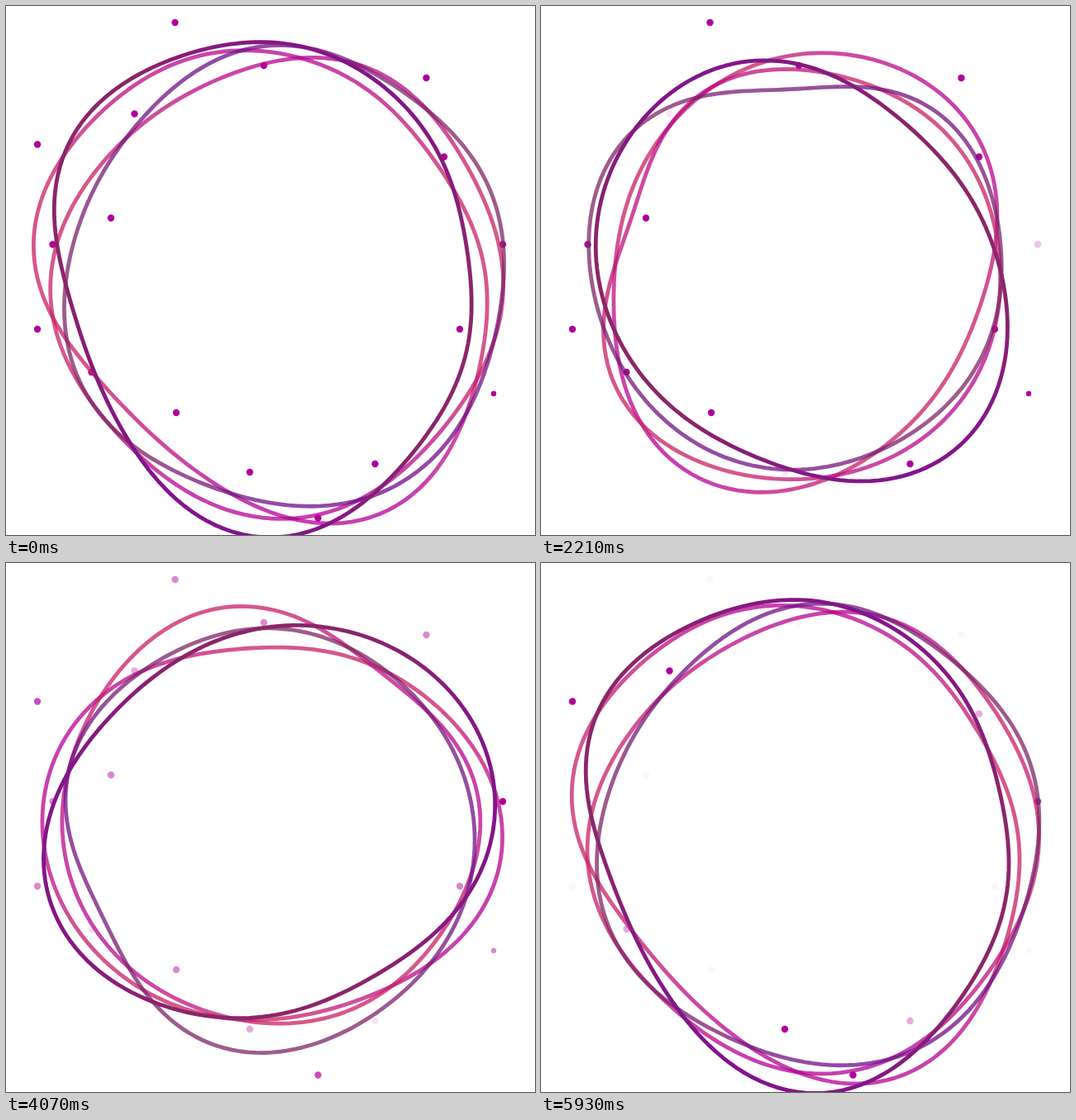
Animation of 640 by 640 pixels, one loop 6000 ms. Source, as an HTML page with a canvas:

```html
<!DOCTYPE html>
<html lang="en">
<head>
<meta charset="utf-8">
<title>Turning rings</title>
<style>
  html, body { margin: 0; width: 100%; height: 100%; overflow: hidden; background: #fff; }
  canvas { display: block; width: 640px; height: 640px; }
</style>
</head>
<body>
<canvas id="stage" width="640" height="640"></canvas>
<script>
const ctx = document.getElementById('stage').getContext('2d');
const LOOP = 6000, BLINK = 2550, CENTER = 320, TAU = Math.PI * 2;

// Each blob swells from its rest outline to its bent one and back.
// Outlines are radii at equal angles, clockwise from the right; axis is the gradient direction.
const wide = {
  axis: 117,
  rest: [241, 262, 290, 323, 285, 246, 252, 287, 284, 276, 262, 245],
  bent: [228, 237, 250, 254, 258, 229, 202, 204, 241, 282, 268, 232]
};
const dented = {
  axis: 90,
  rest: [281, 282, 292, 300, 278, 269, 265, 243, 235, 252, 273, 269],
  bent: [268, 249, 202, 219, 241, 230, 230, 233, 239, 244, 243, 253]
};

const rings = [
  { blob: wide, spin: -1, start: -26, edge: '#b40096', middle: '#c82064', alpha: 0.75 },
  { blob: dented, spin: 1, start: 0, edge: '#b40096', middle: '#c82064', alpha: 0.75 },
  { blob: dented, spin: -1, start: -26, edge: '#6e0c8a', middle: '#7d2666', alpha: 0.75 },
  { blob: wide, spin: 1, start: 0, edge: '#82148c', middle: '#8a2669', alpha: 1 }
];

// Dots stay full until their delay, then blink; a negative delay starts mid-blink.
const dotGroups = [
  { delay: -300, spots: [[204.5, 20], [312, 72], [508.5, 87], [127, 256.5], [56.5, 288.5],
                         [38, 391], [549, 391], [590, 469, 3.2], [206, 492]] },
  { delay: 0, spots: [[530, 182.5], [103.5, 443], [446.5, 554]] },
  { delay: 700, spots: [[155.5, 130.5], [295, 564]] },
  { delay: 950, spots: [[38, 167.5], [377.5, 619.5]] },
  { delay: 1300, spots: [[601, 288.5]] }
];

const mix = (a, b, p) => a + (b - a) * p;
const radians = degrees => degrees / 360 * TAU;
const ease = p => p - 0.05 * Math.sin(TAU * p);
const bend = t => ease(1 - Math.abs(1 - 2 * t / LOOP));

// Trigonometric interpolation through evenly spaced radii.
function radiusAt(radii, angle) {
  const n = radii.length;
  return radii.reduce((sum, r, i) => {
    const d = angle - i * TAU / n;
    const s = Math.sin(d / 2);
    const weight = Math.abs(s) < 1e-6 ? 1 : Math.sin(n * d / 2) * Math.cos(d / 2) / (n * s);
    return sum + r * weight;
  }, 0);
}

function drawRing({ blob, spin, start, edge, middle, alpha }, t) {
  const radii = blob.rest.map((r, i) => mix(r, blob.bent[i], bend(t)));
  ctx.save();
  ctx.translate(CENTER, CENTER);
  ctx.rotate(radians(start) + spin * TAU * t / LOOP);

  ctx.beginPath();
  for (let i = 0; i < 180; i++) {
    const angle = i / 180 * TAU;
    const r = radiusAt(radii, angle);
    ctx.lineTo(r * Math.cos(angle), r * Math.sin(angle));
  }
  ctx.closePath();

  const dx = 280 * Math.cos(radians(blob.axis)), dy = 280 * Math.sin(radians(blob.axis));
  const paint = ctx.createLinearGradient(-dx, -dy, dx, dy);
  paint.addColorStop(0, edge);
  paint.addColorStop(0.3, middle);
  paint.addColorStop(0.7, middle);
  paint.addColorStop(1, edge);
  ctx.globalAlpha = alpha;
  ctx.strokeStyle = paint;
  ctx.stroke();
  ctx.restore();
}

function drawDots({ delay, spots }, t) {
  const wave = 0.5 + 0.5 * Math.cos(TAU * Math.max(0, t - delay) / BLINK);
  ctx.globalAlpha = Math.min(1, 1.2 * wave);
  for (const [x, y, r = 4.2] of spots) {
    ctx.beginPath();
    ctx.arc(x, y, r, 0, TAU);
    ctx.fill();
  }
}

function draw() {
  const t = performance.now() % LOOP;
  ctx.globalAlpha = 1;
  ctx.fillStyle = '#fff';
  ctx.fillRect(0, 0, 640, 640);
  ctx.fillStyle = '#b0009b';
  dotGroups.forEach(group => drawDots(group, t));
  ctx.lineWidth = 4.8;
  ctx.lineJoin = 'round';
  rings.forEach(ring => drawRing(ring, t));
  requestAnimationFrame(draw);
}
draw();
</script>
</body>
</html>
```
